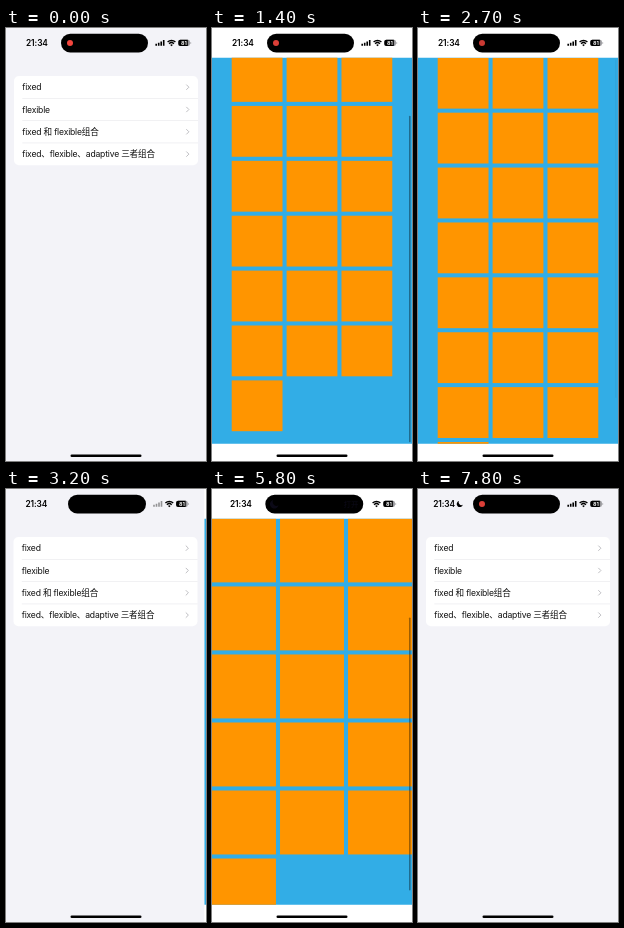
Write an HTML page that moves like this. It is 200 by 433 pixels and loops after 8 s.

```html
<!DOCTYPE html>
<html lang="zh-CN">
<head>
<meta charset="utf-8">
<title>Grid layouts</title>
<style>
  html, body { margin: 0; width: 100%; height: 100%; overflow: hidden; background: #f3f3f8; }
  svg { display: block; width: 100vw; height: 100vh; }
  text { font-family: Inter, "Noto Sans CJK SC", "Noto Sans CJK", sans-serif; }
  .row { font-size: 8.6px; letter-spacing: -.19px; fill: #111; }
  .time { font-size: 8.4px; font-weight: 600; letter-spacing: -.1px; }
</style>
</head>
<body>
<svg viewBox="0 0 200 433" preserveAspectRatio="none">
  <defs>
    <clipPath id="view"><rect y="29.7" width="200" height="386"/></clipPath>
    <path id="crescent" d="M-.8-3A3.1 3.1 0 1 0 3 .8A2.8 2.8 0 0 1-.8-3Z"/>
  </defs>
  <rect width="200" height="433" fill="#f3f3f8"/>
  <g id="list">
    <rect x="8" y="48" width="184" height="89.2" rx="5" fill="#fff"/>
  </g>
  <rect id="dim" width="200" height="433"/>
  <g id="page">
    <rect width="200" height="433" fill="#fff"/>
    <g clip-path="url(#view)">
      <rect y="29" width="200" height="388" fill="#32ade6"/>
      <g id="fixed" fill="#ff9500"></g>
      <g id="flexible" fill="#ff9500"></g>
      <rect id="bar" x="197" width="1.6" rx=".8"/>
    </g>
  </g>
  <text id="time" class="time" y="18">21:34</text>
  <use id="focus" href="#crescent"/>
  <rect id="island" y="5.8" height="18.6" rx="9.3"/>
  <circle id="dot" cx="64" cy="15" r="3" fill="#f4463e"/>
  <g id="notice" fill="#6a5be2">
    <use href="#crescent" transform="translate(62.3 15.2) scale(1.4)"/>
    <text x="131.5" y="17.9" font-size="7.4" font-weight="500">打开</text>
  </g>
  <g id="icons">
    <path id="signal" stroke="#000" stroke-width="1.6" d="M150.2 17.8v-2M152.7 17.8v-3M155.2 17.8v-4.3M157.7 17.8v-5.7"/>
    <path fill="none" stroke="#000" stroke-width="1.4" d="M161.6 14.1a5.6 5.6 0 0 1 7.8 0M163.1 15.7a3.4 3.4 0 0 1 4.8 0"/>
    <path d="M165.5 18.3l-1.3-1.4a1.9 1.9 0 0 1 2.6 0z"/>
    <rect x="172.3" y="11.8" width="11.6" height="6.3" rx="2" fill="#98989c"/>
    <path d="M181.8 11.8h-7.5a2 2 0 0 0-2 2v2.3a2 2 0 0 0 2 2h7.5z"/>
    <path d="M184.4 14v2q.9-.3.9-1t-.9-1z" fill="#98989c"/>
    <text x="178" y="17" font-size="5.4" font-weight="700" fill="#fff" text-anchor="middle">81</text>
  </g>
  <rect x="64.5" y="426.4" width="71" height="2.5" rx="1.25"/>
</svg>
<script>
const LOOP = 8000, TOP = 29.7, VIEW = 386, ITEMS = 22, GAP = 4.07, ROW = 22.3;
const $ = id => document.getElementById(id);
const clamp = v => Math.max(0, Math.min(1, v));

// Smooth step from 0 to 1 between times a and b
function ease(t, a, b) {
  const u = clamp((t - a) / (b - a));
  return u * u * (3 - 2 * u);
}
// Remaining distance of a critically damped spring
function spring(ms, rate) {
  const w = Math.max(0, ms) * rate;
  return (1 + w) * Math.exp(-w);
}

function set(el, attrs) {
  for (const k in attrs) el.setAttribute(k, attrs[k]);
}
function add(parent, tag, attrs, text) {
  const el = document.createElementNS('http://www.w3.org/2000/svg', tag);
  set(el, attrs);
  if (text) el.textContent = text;
  parent.appendChild(el);
  return el;
}

// List rows
const labels = ['fixed', 'flexible', 'fixed 和 flexible组合', 'fixed、flexible、adaptive 三者组合'];
const list = $('list');
const marks = [
  add(list, 'path', { d: 'M8 70.3V53a5 5 0 0 1 5-5h174a5 5 0 0 1 5 5v17.3z', fill: '#d1d1d6' }),
  add(list, 'rect', { x: 8, y: 48 + ROW, width: 184, height: ROW, fill: '#d1d1d6' })
];
labels.forEach((label, i) => {
  const y = 59.2 + i * ROW;
  add(list, 'text', { class: 'row', x: 16.2, y: y + 3 }, label);
  add(list, 'path', { d: `M180.3 ${y - 2.6}l2.6 2.6l-2.6 2.6`, fill: 'none', stroke: '#bfbfc3' });
  if (i) add(list, 'rect', { x: 16.3, y: 47.8 + i * ROW, width: 175.7, height: .5, fill: '#e2e2e6' });
});

// Grids
function grid(id, size) {
  const el = $(id), pitch = size + GAP, left = (200 - 3 * size - 2 * GAP) / 2;
  for (let i = 0; i < ITEMS; i++) {
    add(el, 'rect', {
      x: left + i % 3 * pitch, y: TOP + Math.floor(i / 3) * pitch, width: size, height: size
    });
  }
  return { el, height: Math.ceil(ITEMS / 3) * pitch - GAP };
}

// push, touch, pulled, back, end: times; pull: overscroll at the top
const screens = [
  { ...grid('fixed', 50.82), push: 228, touch: 1030, pulled: 2100, pull: 26.7, back: 2840, end: 3222 },
  { ...grid('flexible', 63.95), push: 4456, touch: 5530, pulled: 6400, pull: 40, back: 7530, end: 7780 }
];

const popped = (s, t) => ease(t, s.back, s.end);

function pageX(s, t) {
  if (t < s.push || t >= s.end) return 200;
  return 200 * Math.max(spring(t - s.push, .018), popped(s, t));
}

// Drag past the bottom, pull past the top, then bounce back
function scrollY(s, t) {
  if (t > s.pulled) return s.pull * spring(t - s.pulled, .013);
  const u = (t - s.touch) / (s.pulled - s.touch), depth = s.height - VIEW + 22;
  return -depth * ease(u, 0, .45) + (depth + s.pull) * ease(u, .5, 1);
}

function drawScroll(s, t) {
  const y = scrollY(s, t), max = s.height - VIEW;
  const over = Math.max(0, y, -y - max);
  const len = 382 * VIEW / s.height - over;
  const alpha = ease(t, s.touch, s.touch + 90) - ease(t, s.pulled + 400, s.pulled + 650);
  set(s.el, { transform: `translate(0 ${y})` });
  set($('bar'), { y: TOP + 1.5 + clamp(-y / max) * (383 - len), height: len, 'fill-opacity': .38 * alpha });
}

function drawStatus(t) {
  const shrink = ease(t, 2950, 3200), grow = ease(t, 3200, 3450);
  const restore = ease(t, 5700, 6100), focus = ease(t, 6200, 6650);
  const left = 55 + 7 * shrink - 9 * grow + 2 * restore;
  const right = 142 - 2 * shrink + 13 * grow - 11 * restore;
  const pulse = 1 - .2 * Math.sin(Math.PI * t / 800) ** 2;
  const x = 20 - .5 * shrink - 1.5 * grow - 2.8 * focus;
  set($('island'), { x: left, width: right - left });
  set($('dot'), { opacity: pulse * (1 - shrink + focus) });
  set($('notice'), { opacity: ease(t, 3300, 3750) - ease(t, 5600, 5850) });
  set($('signal'), { opacity: 1 - .6 * shrink - .4 * grow + ease(t, 6100, 6550) });
  set($('icons'), { transform: `translate(${-2.2 * shrink + 1.2 * grow + focus} 0)` });
  set($('time'), { x });
  set($('focus'), { transform: `translate(${x + 26.6} 15)`, opacity: focus });
}

function draw(t) {
  const index = t < LOOP / 2 ? 0 : 1, s = screens[index];
  const x = pageX(s, t), shown = 1 - x / 200;
  screens.forEach((other, i) => {
    const active = i === index && t >= s.push - 30;
    set(other.el, { visibility: i === index ? 'visible' : 'hidden' });
    set(marks[i], { opacity: active ? 1 - popped(s, t) : 0 });
  });
  drawScroll(s, t);
  set($('page'), { transform: `translate(${x} 0)` });
  set(list, { transform: `translate(${-60 * shown} 0)` });
  set($('dim'), { opacity: .1 * shown });
  drawStatus(t);
}

const start = performance.now();
function tick() {
  draw((performance.now() - start) % LOOP);
  requestAnimationFrame(tick);
}
tick();
</script>
</body>
</html>
```
